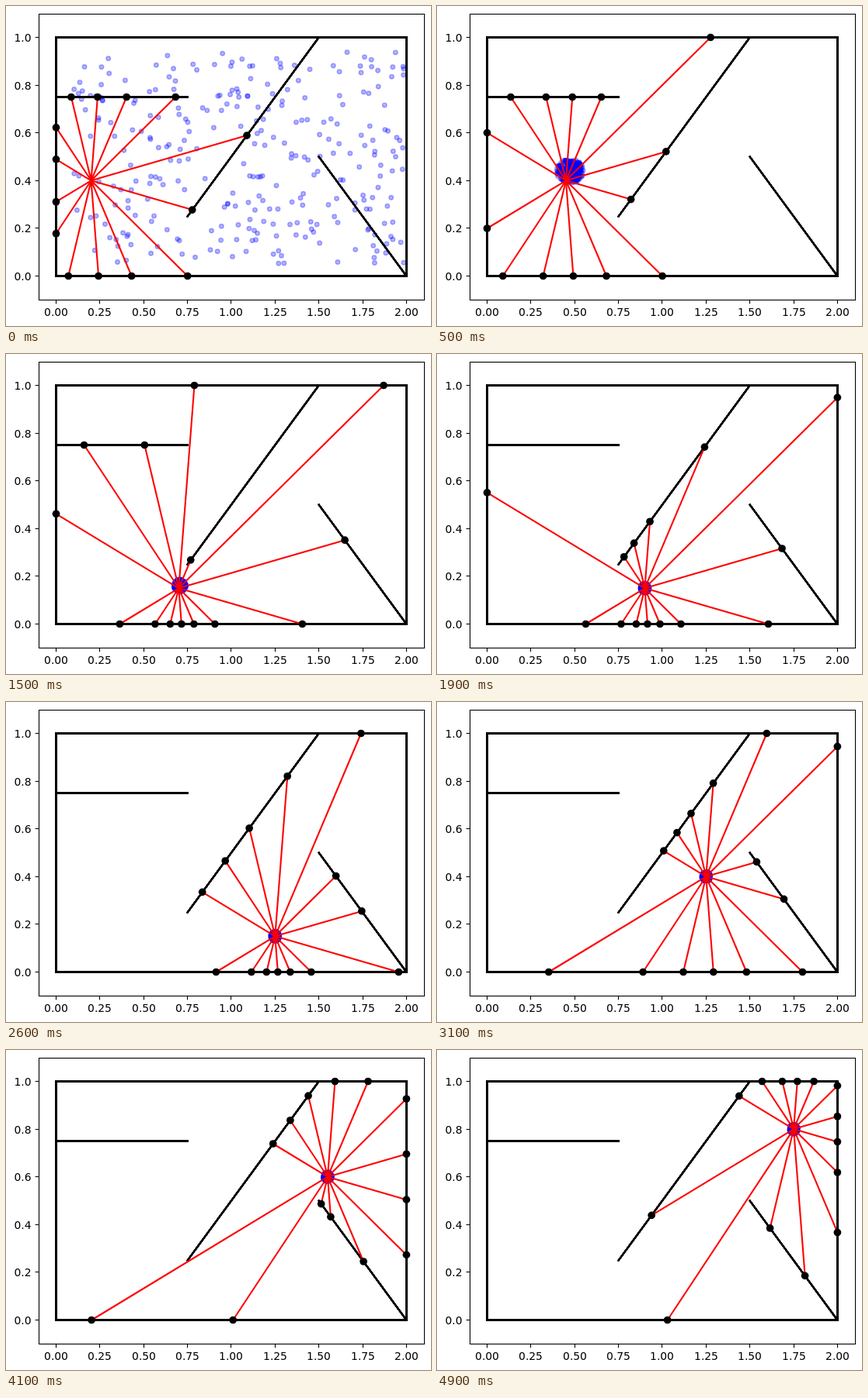
Recreate the animation shown at these times as an HTML page with a canvas. Size 547 by 413 pixels, loop 5 s.

```html
<!DOCTYPE html>
<html lang="en">
<head>
<meta charset="utf-8">
<title>Particle filter localisation</title>
<style>
  html, body { margin: 0; width: 100%; height: 100%; overflow: hidden; background: #fff; }
  canvas { display: block; width: 547px; height: 413px; }
</style>
</head>
<body>
<canvas id="plot" width="547" height="413"></canvas>
<script>
const ctx = document.getElementById('plot').getContext('2d');
const STEP_MS = 100, STEPS = 50, STRIDE = 0.05, COUNT = 290;
const px = x => 64.5 + 225.45 * x;
const py = y => 348.5 - 308 * y;

const walls = [
  [0, 0, 2, 0], [2, 0, 2, 1], [2, 1, 0, 1], [0, 1, 0, 0],
  [0, 0.75, 0.75, 0.75], [0.75, 0.25, 1.5, 1], [1.5, 0.5, 2, 0]
];

// Sensor directions every 24 degrees, without the one facing backwards
const angles = [];
for (let a = 12; a < 360; a += 24) if (a !== 180) angles.push(a * Math.PI / 180);

// Robot route: [dx, dy, number of strides]
const legs = [
  [1, 0, 7], [0, -1, 5], [1, 0, 14], [0, 1, 8],
  [1, 0, 4], [0, 1, 1], [1, 0, 6], [0, 1, 4]
];
const route = [[0.2, 0.4]];
for (const [dx, dy, n] of legs) {
  for (let i = 0; i < n; i++) {
    const [x, y] = route[route.length - 1];
    route.push([x + dx * STRIDE, y + dy * STRIDE]);
  }
}

function seeded(seed) {
  return () => {
    seed = (seed + 0x6D2B79F5) | 0;
    let t = Math.imul(seed ^ (seed >>> 15), 1 | seed);
    t = (t + Math.imul(t ^ (t >>> 7), 61 | t)) ^ t;
    return ((t ^ (t >>> 14)) >>> 0) / 4294967296;
  };
}

function line(x1, y1, x2, y2) {
  ctx.beginPath();
  ctx.moveTo(x1, y1);
  ctx.lineTo(x2, y2);
  ctx.stroke();
}

function disc(x, y, r) {
  ctx.beginPath();
  ctx.arc(px(x), py(y), r, 0, 2 * Math.PI);
  ctx.fill();
}

// Nearest wall point seen from (x, y) in direction a
function castRay(x, y, a) {
  const dx = Math.cos(a), dy = Math.sin(a);
  let best = Infinity;
  for (const [x1, y1, x2, y2] of walls) {
    const wx = x2 - x1, wy = y2 - y1;
    const det = dx * wy - dy * wx;
    if (Math.abs(det) < 1e-9) continue;
    const dist = ((x1 - x) * wy - (y1 - y) * wx) / det;
    const along = ((x1 - x) * dy - (y1 - y) * dx) / det;
    if (dist > 1e-6 && along >= 0 && along <= 1) best = Math.min(best, dist);
  }
  return [x + dx * best, y + dy * best];
}

// Uniform at first, then a cloud tightening around the robot
function particles(step) {
  const rnd = seeded(17 + step);
  const [x, y] = route[step];
  const lag = Math.max(0, 1 - (step - 1) / 18);
  const early = 0.15 * Math.exp(-step / 2);
  const sx = 0.025 + 0.05 * lag + early;
  const sy = 0.02 + 0.025 * lag + early;
  return Array.from({ length: COUNT }, () => {
    const u = rnd(), v = rnd();
    if (step === 0) return [0.1 + 1.885 * u, 0.05 + 0.9 * v];
    const r = Math.sqrt(u), t = 2 * Math.PI * v;
    return [x + 0.03 * lag + sx * r * Math.cos(t), y + 0.05 * lag + sy * r * Math.sin(t)];
  });
}

function drawAxes() {
  ctx.strokeStyle = ctx.fillStyle = '#000';
  ctx.lineWidth = 1.1;
  ctx.strokeRect(42.5, 10.5, 496, 369);
  ctx.font = '13.89px "DejaVu Sans", sans-serif';
  ctx.textBaseline = 'alphabetic';
  ctx.textAlign = 'center';
  for (let i = 0; i <= 8; i++) {
    const x = Math.floor(px(i / 4)) + 0.5;
    line(x, 380, x, 384.4);
    ctx.fillText((i / 4).toFixed(2), x, 400);
  }
  ctx.textAlign = 'right';
  for (let i = 0; i <= 5; i++) {
    const y = Math.floor(py(i / 5)) + 0.5;
    line(37.6, y, 42, y);
    ctx.fillText((i / 5).toFixed(1), 32.6, y + 5.2);
  }
}

function drawWalls() {
  ctx.strokeStyle = '#000';
  ctx.lineWidth = 2.08;
  ctx.lineCap = 'square';
  // Repeated strokes harden the edges
  for (let i = 0; i < 8; i++) {
    for (const [x1, y1, x2, y2] of walls) line(px(x1), py(y1), px(x2), py(y2));
  }
  ctx.lineCap = 'butt';
}

function drawParticles(step) {
  ctx.fillStyle = ctx.strokeStyle = 'rgba(0, 0, 255, 0.3)';
  ctx.lineWidth = 1.39;
  for (const [x, y] of particles(step)) {
    disc(x, y, 2.8);
    ctx.stroke();
  }
}

function drawRays(step) {
  const [x, y] = route[step];
  const hits = angles.map(a => castRay(x, y, a));
  ctx.strokeStyle = '#f00';
  ctx.lineWidth = 2.08;
  for (const [hx, hy] of hits) line(px(x), py(y), px(hx), py(hy));
  ctx.fillStyle = '#000';
  for (const [hx, hy] of hits) disc(hx, hy, 4.86);
}

function draw(step) {
  ctx.fillStyle = '#fff';
  ctx.fillRect(0, 0, 547, 413);
  drawParticles(step);
  drawWalls();
  drawRays(step);
  drawAxes();
}

const start = performance.now();
let shown = 0;
function tick() {
  const step = Math.floor((performance.now() - start) / STEP_MS) % STEPS;
  if (step !== shown) draw(shown = step);
  requestAnimationFrame(tick);
}
draw(0);
tick();
</script>
</body>
</html>
```
